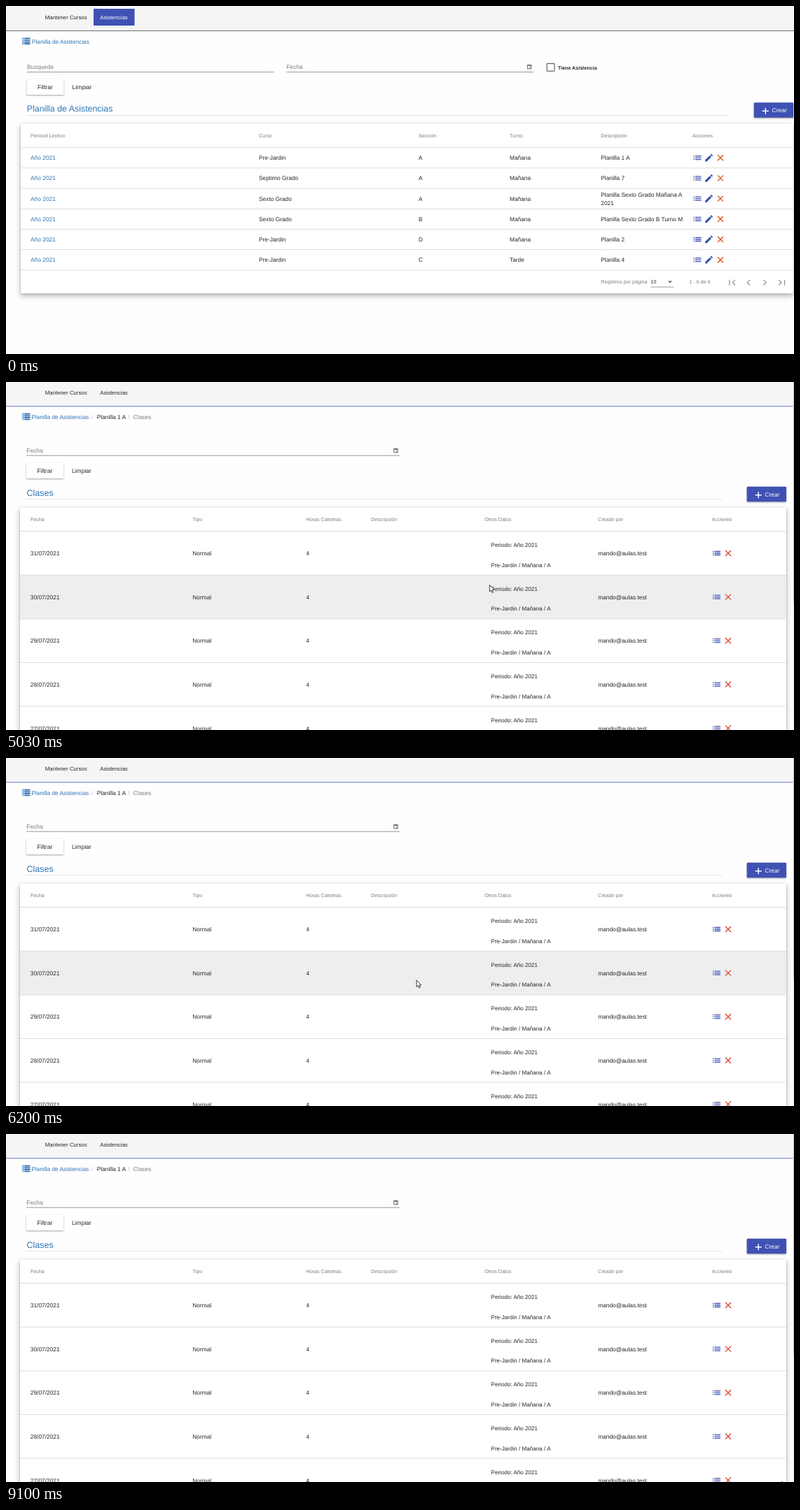
Animation, 1125 px wide and 498 px high, one loop 9.23 s. Source, as an HTML page:

```html
<!DOCTYPE html>
<html lang="es">
<head>
<meta charset="utf-8">
<title>Planilla de Asistencias</title>
<style>
html, body { margin: 0; width: 100%; height: 100%; overflow: hidden; background: #fefefe; }
svg { display: block; width: 1125px; height: 498px; font-family: "Liberation Sans", Arial, sans-serif; text-rendering: geometricPrecision; }
text { white-space: pre; }
.card { fill: #fff; filter: drop-shadow(0 1px 1px rgba(0,0,0,.22)) drop-shadow(0 3px 4px rgba(0,0,0,.27)); }
.raised { filter: drop-shadow(0 1px .8px rgba(0,0,0,.36)); }
.line { fill: none; }
</style>
</head>
<body>
<svg id="stage" viewBox="0 0 1125 498"></svg>
<script>
const BLUE = '#3f51b5', LINK = '#2f75b5', INK = '#262626', GREY = '#7b7b7b';
const LOOP = 9230, STEP = 68, WINDOW_BOTTOM = 496.5;

// Text is placed by its left edge and vertical middle.
const text = (x, mid, str, fill = INK, size = 8.35, extra = '') =>
  `<text x="${x}" y="${mid + size * .36}" font-size="${size}" fill="${fill}" ${extra}>${str}</text>`;
const rect = (x, y, w, h, fill, extra = '') =>
  `<rect x="${x}" y="${y}" width="${w}" height="${h}" fill="${fill}" ${extra}/>`;
const path = (d, stroke, width = 1.2, extra = '') =>
  `<path class="line" d="${d}" stroke="${stroke}" stroke-width="${width}" ${extra}/>`;
const rule = (x1, x2, y, color = '#dedede') => path(`M${x1} ${y}H${x2}`, color, 1);

const listIcon = (x, y) => [-2.5, 0, 2.5].map(d =>
  path(`M${x - 5.5} ${y + d}h1.4m1.1 0h8.5`, BLUE, 1.3)).join('');
const crumbIcon = y => [-3.9, -1.3, 1.3, 3.9].map(d =>
  path(`M23.5 ${y + d}h1.8m.8 0h8.4`, '#1f66b0', 1.7)).join('');
const crossIcon = (x, y, color) => path(`M${x - 4} ${y - 4}l8 8m0 -8l-8 8`, color, 1.25);
const pencilIcon = (x, y) => `<path transform="translate(${x - 7.2} ${y - 7.2}) scale(.6)" fill="${BLUE}"
  d="M3 17.25V21h3.75L17.81 9.94l-3.75-3.75zM20.71 7.04a1 1 0 0 0 0-1.41l-2.34-2.34a1 1 0 0 0-1.41 0l-1.83 1.83 3.75 3.75z"/>`;
const calendarIcon = (x, y) => rect(x - 2.7, y - 2.5, 5.4, 5.4, 'none', 'stroke="#555" stroke-width=".8"')
  + rect(x - 2.8, y - 2.8, 5.6, 1.4, '#555') + rect(x, y + .3, 1.5, 1.5, '#555');
const chevron = (x, y, dir) => path(`M${x - 2 * dir} ${y - 3.7}l${3.7 * dir} 3.7l${-3.7 * dir} 3.7`, '#909090', 1.2);

const filterButtons = (x, y) => rect(x, y - 11, 53, 22, '#fff', 'class="raised" rx="1.5"')
  + text(x + 15.5, y, 'Filtrar', INK, 8.5) + text(x + 65, y, 'Limpiar', INK, 8.5);
const createButton = (x, y) => rect(x, y, 56.3, 21.5, BLUE, 'class="raised" rx="1.2"')
  + path(`M${x + 12} ${y + 12}h9m-4.5 -4.5v9`, '#fff', 1.4)
  + text(x + 25.7, y + 11, 'Crear', '#fff', 8.5);
const heads = (mid, columns) => columns.map(([x, s]) => text(x, mid, s, GREY, 7.15)).join('');

const topBar = (lineY, lineColor, active) => rect(0, 0, 1125, lineY, '#f5f5f5') + rule(0, 1125, lineY, lineColor)
  + (active ? rect(125, 4, 58.5, 24, BLUE) : '')
  + text(55.8, lineY - 19.8, 'Mantener Cursos', INK, 7.8)
  + text(134.2, lineY - 19.8, 'Asistencias', active ? '#fff' : INK, 7.8);

const paginator = (y, range) => text(849.5, y, 'Registros por página', GREY, 7.15)
  + text(920.5, y, '10', INK, 7.15) + rule(920.5, 953.5, y + 7.3, '#999')
  + `<path d="M945 ${y - 1.3}h6l-3 3z" fill="#666"/>` + text(975.5, y, range, GREY, 7.15)
  + path(`M1032.8 ${y - 3}v8`, '#909090') + chevron(1039, y + 1, -1) + chevron(1060, y + 1, -1)
  + chevron(1083.5, y + 1, 1) + chevron(1105.5, y + 1, 1) + path(`M1111.5 ${y - 3}v8`, '#909090');

const sheets = { top: 203, pitch: 29.2, left: 21, right: 1124, count: 6 };
const classes = { top: 214, pitch: 62.6, left: 20, right: 1114, count: 5 };

function sheetsPage() {
  const { top, pitch, left, right } = sheets;
  const rows = [
    ['Pre-Jardin', 'A', 'Mañana', 'Planilla 1 A'],
    ['Septimo Grado', 'A', 'Mañana', 'Planilla 7'],
    ['Sexto Grado', 'A', 'Mañana', 'Planilla Sexto Grado Mañana A|2021'],
    ['Sexto Grado', 'B', 'Mañana', 'Planilla Sexto Grado B Turno M'],
    ['Pre-Jardin', 'D', 'Mañana', 'Planilla 2'],
    ['Pre-Jardin', 'C', 'Tarde', 'Planilla 4']
  ].map(([course, section, shift, note], i) => {
    const y = top + pitch * (i + .5) - .4, lines = note.split('|');
    return text(35, y, 'Año 2021', LINK, 8.4) + text(361, y, course) + text(589, y, section) + text(719, y, shift)
      + lines.map((s, k) => text(849.3, y + 12 * k - 6 * (lines.length - 1), s)).join('')
      + listIcon(987, y) + pencilIcon(1003.6, y) + crossIcon(1020, y, '#dd4f1b')
      + rule(left, right, top + pitch * (i + 1) - .4);
  }).join('');
  return topBar(35.5, '#6b6b6b', true) + crumbIcon(50.3) + text(37, 50.7, 'Planilla de Asistencias', LINK, 8.27)
    + text(30, 86.5, 'Busqueda', GREY, 8.4) + rule(30, 382.5, 94.5, '#999')
    + text(400.5, 86.5, 'Fecha', GREY, 8.4) + rule(400.5, 753, 94.5, '#999') + calendarIcon(747.3, 87)
    + rect(772.2, 82.3, 10.8, 10.8, 'none', 'stroke="#666" stroke-width="1.2" rx=".8"')
    + text(788, 88, 'Tiene Asistencia', INK, 7.1, 'font-weight="bold"')
    + filterButtons(29.5, 116) + text(29.8, 147, 'Planilla de Asistencias', LINK, 12.4) + rule(30, 1031, 156.5, '#e4e4e4')
    + createButton(1067.8, 138.3) + rect(left, 168.5, 1103, 243, '#fff', 'class="card" rx="1"')
    + '<rect class="hover" fill="#eee"/>'
    + heads(185.3, [[35, 'Periood Lectivo'], [361, 'Curso'], [589, 'Sección'], [719, 'Turno'], [849.3, 'Descripción'], [980, 'Acciones']])
    + rule(left, right, top - .5) + rows + paginator(394.8, '1 - 6 de 6');
}

function classesPage() {
  const { top, pitch, left, right, count } = classes;
  const rows = Array.from({ length: count }, (_, i) => {
    const y = top + pitch * i + 31.2;
    return text(34.8, y, `${31 - i}/07/2021`) + text(266.3, y, 'Normal') + text(428.5, y, '4')
      + text(692.5, y - 12, 'Periodo: Año 2021', INK, 8.1) + text(692.5, y + 16.7, 'Pre-Jardin / Mañana / A', INK, 8.1)
      + text(845.2, y, 'mando@aulas.test') + listIcon(1014.5, y - .2) + crossIcon(1031, y - .2, '#e03a30')
      + rule(left, right, top + pitch * (i + 1) - .3);
  }).join('');
  return topBar(34.8, '#6673c5', false) + crumbIcon(49.6) + text(36.5, 50, 'Planilla de Asistencias', LINK, 8.27)
    + text(122, 50, '/', '#bbb') + text(129.8, 50, 'Planilla 1 A') + text(174, 50, '/', '#bbb')
    + text(181.8, 50, 'Clases', GREY) + text(29.3, 98, 'Fecha', GREY, 8.4) + rule(29, 562, 105.2, '#999')
    + calendarIcon(556.5, 98.2) + filterButtons(29, 127) + text(29.5, 158.8, 'Clases', LINK, 12.5)
    + rule(29.5, 1022.5, 167.8, '#e4e4e4') + createButton(1057.7, 149.8)
    + `<rect id="card" class="card" x="${left}" y="180" width="1094" rx="1"/>`
    + '<rect class="hover" fill="#eee"/>'
    + heads(196.8, [[35, 'Fecha'], [266.5, 'Tipo'], [428.5, 'Horas Catedras'], [521, 'Descripción'], [683.3, 'Otros Datos'], [845.3, 'Creado por'], [1007.5, 'Acciones']])
    + rule(left, right, top - .5)
    + `<g id="loaded">${rows}${rect(1123.5, 0, 1.5, 498, '#f1f1f1')}${rect(1124, 0, 1, 318, '#c1c1c1')}</g>`;
}

document.getElementById('stage').innerHTML = `
  <g id="sheets">${sheetsPage()}</g>
  <g id="classes">${classesPage()}</g>
  <g id="tip">${rect(973, 233, 28, 15, '#616161', 'rx="1.2"')}${text(977.4, 240.5, 'Clases', '#fff', 6)}</g>
  <g id="pointer" stroke="#222" stroke-width=".9" fill="#fff" stroke-linejoin="round">
    <path id="arrow" d="M.4 .4V10L2.6 8L4.2 11.5L5.7 10.8L4.2 7.5H7.2Z"/>
    <path id="hand" d="M-1 7.5V1Q0 -.4 1 1V5Q2 4.2 2.8 5.2Q4 4.6 4.5 5.7Q6 5.3 6 6.8V10Q5.6 11.6 4.8 13.4H-.8Q-1.6 11.4 -3.5 8.4Q-3.2 6.6 -1 8.6Z"/>
  </g>`;
const el = Object.fromEntries([...document.querySelectorAll('[id]')].map(n => [n.id, n]));
const show = (node, on) => { node.style.display = on ? '' : 'none'; };

// Pointer moves: start time, number of steps, path points, leaves the stage at the end.
const moves = [
  [310, 4, [[650, 560], [592, 224]]],
  [1040, 4, [[592, 224], [871, 217]]],
  [1580, 6, [[871, 217], [986.7, 217]]],
  [4820, 14, [[986.7, 217], [880, 240], [690, 290], [470, 345], [390, 342], [529, 320.5], [650, 300], [690, 262]]],
  [5790, 14, [[690, 262], [600, 248], [535, 290], [585.7, 317.5], [690, 305], [570, 268], [654, 307]]],
  [6750, 1, [[654, 307], [656, 308]]],
  [7080, 3, [[656, 308], [630, 395]], true],
  [8630, 4, [[960, 510], [1150, 455]], true],
  [9100, 1, [[1107, 510], [1107, 496.8]]]
];

// Catmull-Rom spline; two points give a straight line.
function along(points, u) {
  const last = points.length - 1;
  if (last === 1) return points[0].map((a, k) => a + (points[1][k] - a) * u);
  const i = Math.min(last - 1, Math.floor(u * last + 1e-9)), f = u * last - i;
  const at = n => points[Math.max(0, Math.min(last, n))];
  return [0, 1].map(k => {
    const [a, b, c, d] = [at(i - 1)[k], at(i)[k], at(i + 1)[k], at(i + 2)[k]];
    return b + f / 2 * (c - a + f * (2 * a - 5 * b + 4 * c - d + f * (3 * (b - c) + d - a)));
  });
}

function pointerAt(t) {
  const move = moves.filter(m => t >= m[0]).pop();
  if (!move) return null;
  const [start, steps, points, leaves] = move;
  const u = Math.min(1, (Math.floor((t - start) / STEP) + 1) / steps);
  return leaves && u === 1 ? null : along(points, u);
}

function setHover(page, table, pointer) {
  const row = pointer ? Math.floor((pointer[1] - table.top) / table.pitch) : -1;
  const bar = page.querySelector('.hover');
  const on = row >= 0 && row < table.count && pointer[0] < table.right && pointer[1] < WINDOW_BOTTOM;
  show(bar, on);
  if (!on) return;
  bar.setAttribute('x', table.left);
  bar.setAttribute('width', table.right - table.left);
  bar.setAttribute('y', table.top + row * table.pitch - .3);
  bar.setAttribute('height', table.pitch);
}

function draw(t) {
  const opened = t >= 3620, loaded = t >= 3970, pointer = pointerAt(t);
  show(el.sheets, !opened);
  show(el.classes, opened);
  show(el.loaded, loaded);
  el.card.setAttribute('height', loaded ? 360 : 68);
  setHover(el.sheets, sheets, pointer);
  setHover(el.classes, classes, loaded && pointer);

  show(el.tip, t >= 2020 && !opened);
  el.tip.style.opacity = Math.min(1, (t - 1950) / 280);

  show(el.pointer, pointer);
  if (pointer) el.pointer.setAttribute('transform', `translate(${pointer})`);
  const overLink = !opened && pointer && pointer[0] > 980;
  show(el.hand, overLink);
  show(el.arrow, !overLink);
}

const begin = performance.now();
function tick() {
  draw((performance.now() - begin) % LOOP);
  requestAnimationFrame(tick);
}
tick();
</script>
</body>
</html>
```
